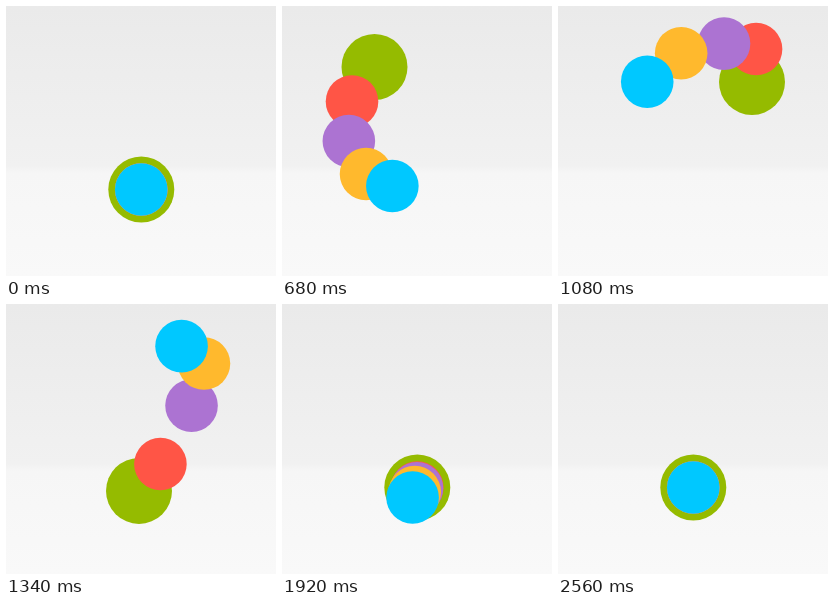
Write an HTML page that moves like this. It is 270 by 270 pixels and loops after 2580 ms.

```html
<!DOCTYPE html>
<html lang="en">
<head>
<meta charset="utf-8">
<title>Looping dots</title>
<style>
  html, body { margin: 0; width: 100%; height: 100%; overflow: hidden; }
  body { background: linear-gradient(#eaeaea, #f1f1f1 59%, #f6f6f6 62%, #f9f9f9); }
  svg { display: block; width: 100%; height: 100%; }
</style>
</head>
<body>
<svg id="stage" viewBox="0 0 270 270"></svg>
<script>
const LOOP = 2580, STEP = 20, LAG = 110;
const REST_Y = 183.5, MID_X = 135, MID_Y = 110;
const COLORS = ['#95bb00', '#ff5546', '#ac73d2', '#ffb92d', '#00c8ff'];

// Shared route: time in ms, x, y
const ROUTE = [
  [0, 135.3, 183.5], [50, 137, 184], [105, 145, 193], [160, 129, 183.8],
  [255, 103, 179], [350, 79, 168], [380, 70.5, 164], [425, 63, 149],
  [460, 62.5, 135], [570, 68, 95], [640, 83, 71], [680, 92.5, 61],
  [750, 122, 41], [860, 168, 33], [910, 184, 33.5], [970, 200, 41],
  [1005, 204.5, 53], [1080, 194, 76], [1125, 188, 104], [1180, 178, 132],
  [1230, 155, 160], [1340, 133, 191], [1410, 127.5, 195.5],
  [1480, 130, 193.5], [1590, 132.5, 188], [1700, 135, 184.3],
  [1780, 135.3, 183.5]
];
const LAST = ROUTE.length - 1;

function slope(i, axis) {
  if (i === 0 || i === LAST) return 0;
  const a = ROUTE[i - 1], b = ROUTE[i + 1];
  return (b[axis] - a[axis]) / (b[0] - a[0]);
}

// Cubic Hermite interpolation along the route
function routeAt(t) {
  if (t <= 0) return ROUTE[0].slice(1);
  if (t >= ROUTE[LAST][0]) return ROUTE[LAST].slice(1);
  const i = ROUTE.findIndex(p => p[0] > t) - 1;
  const a = ROUTE[i], b = ROUTE[i + 1], span = b[0] - a[0];
  const u = (t - a[0]) / span, v = 1 - u;
  return [1, 2].map(k =>
    v * v * (1 + 2 * u) * a[k] + u * u * (3 - 2 * u) * b[k] +
    u * v * span * (v * slope(i, k) - u * slope(i + 1, k)));
}

// Trailing dots take a slightly tighter turn; the big one overshoots less
function place(i, time) {
  let [x, y] = routeAt(time - i * LAG);
  const k = 1 - 0.03 * i;
  x = MID_X + (x - MID_X) * k;
  if (y < MID_Y) y = MID_Y + (y - MID_Y) * k;
  if (i === 0 && y > REST_Y) y = REST_Y + (y - REST_Y) * 0.45;
  return [x, y];
}

const stage = document.getElementById('stage');
const dots = COLORS.map((color, i) => {
  const dot = document.createElementNS(stage.namespaceURI, 'circle');
  dot.setAttribute('r', i ? 26.3 : 33);
  dot.setAttribute('fill', color);
  return stage.appendChild(dot);
});

function draw(time) {
  dots.forEach((dot, i) => {
    const [x, y] = place(i, time);
    dot.setAttribute('cx', x.toFixed(2));
    dot.setAttribute('cy', y.toFixed(2));
  });
}

const start = performance.now();
function tick() {
  const t = (performance.now() - start) % LOOP;
  draw(Math.floor(t / STEP) * STEP);
  requestAnimationFrame(tick);
}
tick();
</script>
</body>
</html>
```
